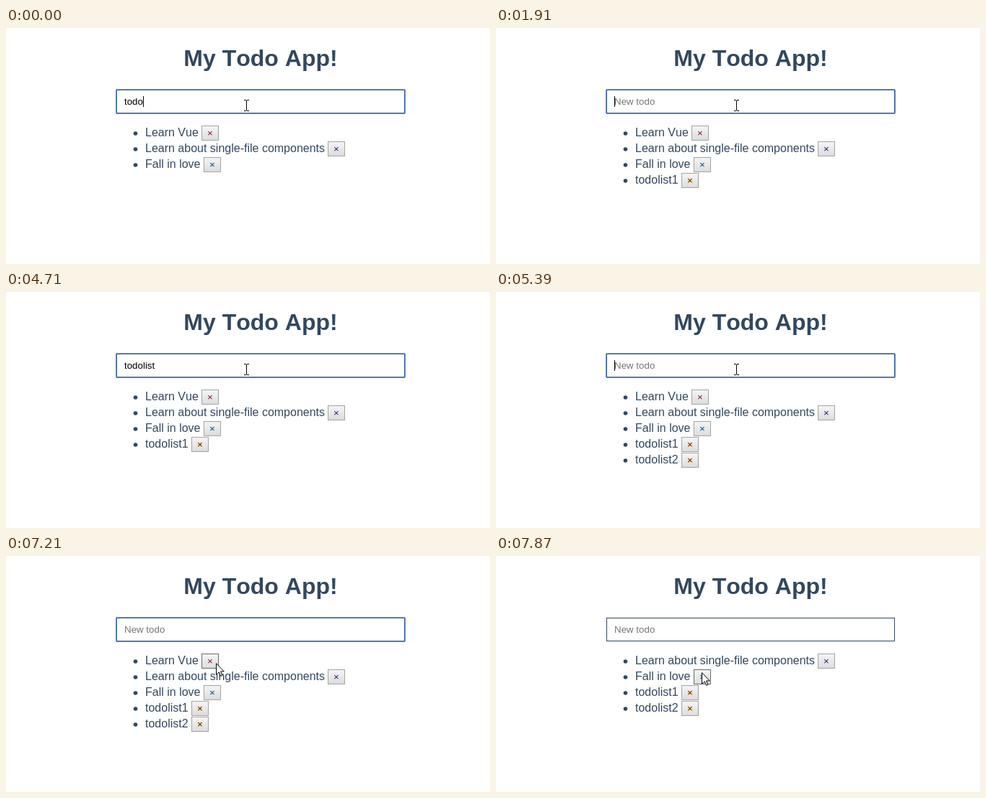
An HTML page that plays this animation: 671x329 px, repeating every 7990 ms.

```html
<!DOCTYPE html>
<html lang="en">
<head>
<meta charset="utf-8">
<title>My Todo App!</title>
<style>
  html, body { margin: 0; width: 100%; height: 100%; overflow: hidden; background: #fff; }
  svg { display: block; width: 671px; height: 329px; }
  text { font-family: "Liberation Sans", Arial, sans-serif; font-kerning: none; white-space: pre; }
  .ink { fill: #32485f; }
  h1, .title { font-size: 32px; font-weight: bold; text-anchor: middle; }
  .field { font-size: 13.333px; }
  .row text { font-size: 16px; }
  .row .mark { font-size: 13.333px; text-anchor: middle; paint-order: stroke; stroke-width: 1.5px; }
  .box { fill: url(#face); stroke: #a3a3a3; }
  .hover .box { stroke: #6a6a6a; }
</style>
</head>
<body>
<svg viewBox="0 0 671 329" xmlns="http://www.w3.org/2000/svg">
  <defs>
    <linearGradient id="face" x2="0" y2="1">
      <stop offset="0" stop-color="#f5f5f5"/>
      <stop offset="1" stop-color="#dcdcdc"/>
    </linearGradient>
  </defs>
  <rect width="671" height="329" fill="#fff"/>
  <text class="ink title" x="353" y="53">My Todo App!</text>

  <rect x="153.5" y="86.5" width="399" height="32" fill="#fff" stroke="#32485f"/>
  <rect id="ring" x="153" y="86" width="400" height="33" rx="1" fill="none"
        stroke="#3f6fb5" stroke-width="2" opacity=".8"/>
  <text id="hint" class="field" x="164" y="107" fill="#757575">New todo</text>
  <text id="typed" class="field" x="164" y="107"></text>
  <rect id="caret" y="95" width="1" height="15"/>

  <g id="list"></g>

  <path id="beam" fill="none" stroke="#000"
        d="M-3 -7.5h3m1 0h3M.5 -7v14M-3 7.5h3m1 0h3"/>
  <path id="arrow" fill="#fff" stroke="#000"
        d="M.5 .7V16.4L4.2 12.9L6.7 18.5L8.9 17.5L6.5 12H11.3Z"/>
</svg>
<script>
const LOOP = 7990;
const $ = id => document.getElementById(id);

// [label, button x, mark colour, halo, added at, removed at]
const items = [
  ["Learn Vue", 271, "#7d1420", "none", 0, 7480],
  ["Learn about single-file components", 446, "#1c1c80", "none", 0, LOOP],
  ["Fall in love", 274, "#14456e", "#cdeeff", 0, LOOP],
  ["todolist1", 257, "#4a2200", "#ffd9a0", 1910, LOOP],
  ["todolist2", 257, "#4a2200", "#ffd9a0", 5390, LOOP]
];

// [time, input text, caret shown]
const typing = [
  [0, "todo", 1], [120, "todol", 1], [270, "todoli", 1], [390, "todolis", 1],
  [670, "todolist", 1], [1230, "todolist", 0], [1360, "todolist1", 1],
  [1790, "todolist1", 0], [1910, "", 1], [2490, "t", 1], [2770, "to", 1],
  [2920, "tod", 1], [3450, "todo", 1], [3760, "todol", 1], [3880, "todoli", 1],
  [4030, "todolis", 1], [4310, "todolist", 1], [4710, "todolist", 0],
  [4980, "todolist2", 1], [5390, "", 1], [5850, "", 0], [6410, "", 1], [6930, "", 0]
];

// [time, x, y, pointer, hovered item]
const moves = [
  [0, 333, 108, "beam", -1], [6410, 331, 109, "beam", -1], [6540, 324, 115, "beam", -1],
  [6660, 313, 127, "arrow", -1], [6810, 308, 136, "arrow", -1], [6930, 303, 144, "arrow", -1],
  [7080, 297, 147, "arrow", -1], [7210, 291, 149, "arrow", 0], [7480, 286, 142, "arrow", -1],
  [7750, 286, 152, "arrow", -1], [7870, 285, 162, "arrow", 2]
];

const rows = items.map(([label, x, color, halo]) => {
  $("list").insertAdjacentHTML("beforeend", `<g class="row">
    <circle class="ink" cx="179.5" cy="147" r="2.8"/>
    <text class="ink" x="193" y="151">${label}</text>
    <rect class="box" x="${x + .5}" y="136.5" width="23" height="20"/>
    <text class="mark" x="${x + 12}" y="151" fill="${color}" stroke="${halo}">×</text></g>`);
  return $("list").lastElementChild;
});

const at = (steps, t) => steps.findLast(s => s[0] <= t);
const show = (el, on) => el.setAttribute("visibility", on ? "visible" : "hidden");

function draw(t) {
  const [, text, caret] = at(typing, t);
  const [, x, y, pointer, hover] = at(moves, t);

  $("typed").textContent = text;
  show($("hint"), !text);
  show($("caret"), caret);
  $("caret").setAttribute("x", 164 + (text ? Math.round($("typed").getComputedTextLength()) : 0));
  show($("ring"), t < 7480);

  let line = 0;
  rows.forEach((row, i) => {
    const on = t >= items[i][4] && t < items[i][5];
    show(row, on);
    row.classList.toggle("hover", i === hover);
    row.setAttribute("transform", `translate(0 ${22 * line})`);
    if (on) line++;
  });

  for (const id of ["beam", "arrow"]) {
    show($(id), id === pointer);
    $(id).setAttribute("transform", `translate(${x} ${y})`);
  }
}

const start = performance.now();
function tick() {
  draw((performance.now() - start) % LOOP);
  requestAnimationFrame(tick);
}
tick();
</script>
</body>
</html>
```
